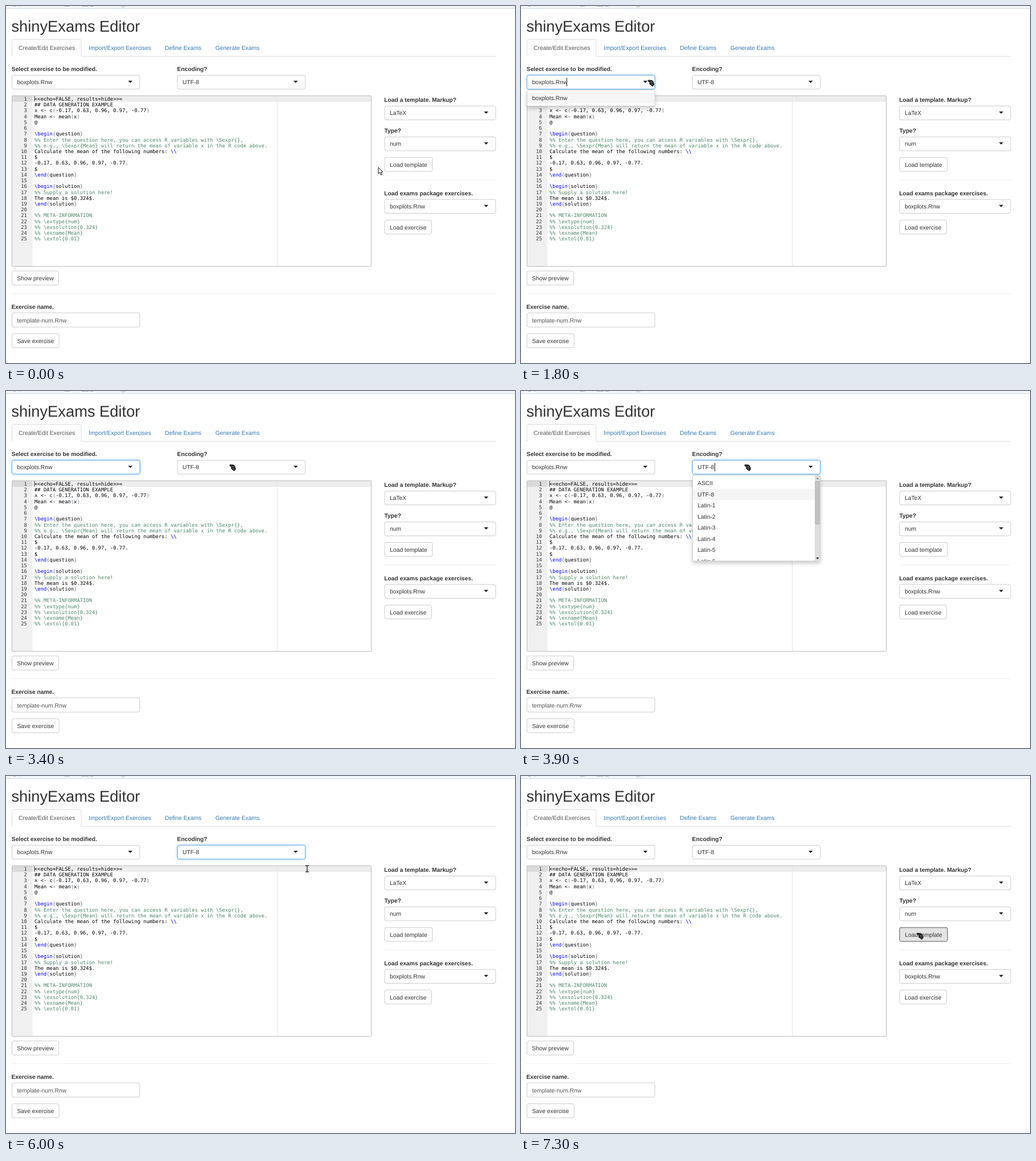
These frames come from a looping animation (894 px wide and 626 px high, 8 s). An HTML page:

```html
<!DOCTYPE html>
<html lang="en">
<head>
<meta charset="utf-8">
<title>shinyExams Editor</title>
<style>
  html, body { margin: 0; width: 100%; height: 100%; overflow: hidden; background: #fff; }
  svg { display: block; text-rendering: geometricPrecision; }
  text { font: 10.33px "Liberation Sans", Arial, sans-serif; fill: #333; }
  .title { font-size: 27.3px; }
  .label { font-size: 10.27px; font-weight: bold; }
  .link { fill: #337ab7; }
  .muted { fill: #555; }
  .mid { text-anchor: middle; }
  .code, .num { font: 8.845px "DejaVu Sans Mono", monospace; fill: #000; }
  .num { fill: #333; text-anchor: end; }
  .comment { fill: #4c886b; }
  .keyword { fill: #00f; }
  .paren { fill: #687687; }
  .box { fill: #fff; stroke: #ccc; }
  .glow { fill: #fff; stroke: #66afe9; filter: drop-shadow(0 0 2.5px rgba(102,175,233,.6)); }
  .menu { fill: #fff; stroke: #d0d0d0; filter: drop-shadow(0 4.5px 3.5px rgba(0,0,0,.2)); }
  .rule { stroke: #eee; }
</style>
</head>
<body>
<svg id="stage" width="894" height="626" viewBox="0 0 894 626"></svg>
<script>
const ROW = 10.22, ITEM = 19.57;
const source = String.raw`<<echo=FALSE, results=hide>>=
## DATA GENERATION EXAMPLE
x <- c(-0.17, 0.63, 0.96, 0.97, -0.77)
Mean <- mean(x)
@

\begin{question}
%% Enter the question here, you can access R variables with \Sexpr{},
%% e.g., \Sexpr{Mean} will return the mean of variable x in the R code above.
Calculate the mean of the following numbers: \\
$
-0.17, 0.63, 0.96, 0.97, -0.77.
$
\end{question}

\begin{solution}
%% Supply a solution here!
The mean is $0.324$.
\end{solution}

%% META-INFORMATION
%% \extype{num}
%% \exsolution{0.324}
%% \exname{Mean}
%% \extol{0.01}`.split("\n");

const text = (x, y, str, cls = "") => `<text x="${x}" y="${y}" class="${cls}">${str}</text>`;
const rect = (x, y, w, h, attrs) => `<rect x="${x}" y="${y}" width="${w}" height="${h}" ${attrs}/>`;
const path = (d, attrs) => `<path d="${d}" ${attrs}/>`;
const hidden = (id, body) => `<g id="${id}" opacity="0">${body}</g>`;

function select(x, y, w, value, id) {
  const size = [x, y, w, 24.3];
  return rect(...size, 'rx="3" class="box"')
    + (id ? hidden(id, rect(...size, 'rx="3" class="glow"')) : "")
    + text(x + 8.9, y + 15.5, value)
    + path(`M${x + w - 20.5} ${y + 9.5}h7.6l-3.8 4z`, 'fill="#222"');
}

const button = (x, y, w, label) =>
  rect(x, y, w, 24.5, 'rx="3" class="box"') + text(x + w / 2, y + 16.2, label, "mid");

function codeLine(line, i) {
  const y = 166 + i * ROW;
  const safe = line.replace(/</g, "&lt;").replace(/>/g, "&gt;");
  const body = line.startsWith("%%") ? safe : safe
    .replace(/[{}()]/g, '<tspan class="paren">$&</tspan>')
    .replace(/\\(\\|[a-z]+)/g, '<tspan class="keyword">$&</tspan>');
  return text(36.9, y, i + 1, "num")
    + text(50, y, body, line.startsWith("%%") ? "code comment" : "code");
}

const editor = rect(10.5, 157.3, 631, 299.2, 'fill="#fff"')
  + rect(11, 157.5, 35.5, 299, 'fill="#f0f0f0"')
  + rect(11, 157.5, 35.5, 10.5, 'fill="#dadada"')
  + rect(46.5, 157.5, 595, 10.5, 'fill="#ededed"')
  + path("M476.5 157.5V456", 'stroke="#e6e6e6"')
  + source.map(codeLine).join("")
  + path("M50.2 158V167.5", 'stroke="#000" stroke-width=".8"')
  + rect(10.5, 157.3, 631, 299.2, 'rx="1" fill="none" stroke="#bbb"');

const browserEdge = rect(0, 0, 894, 4, 'fill="#f3f7f9"')
  + path("M0 4.5H894", 'stroke="#d3dde1"')
  + path("M13 .5h4M24 .5h1M103 .5h9M133 .5h12M148 .5h6", 'stroke="#b5babd"')
  + '<circle cx="206" cy="-2" r="4" fill="none" stroke="#b5babd"/>';

const tabs = path("M132 88.3H861", 'stroke="#ddd"')
  + path("M10.5 88.3V61.5q0-3 3-3H129q3 0 3 3V88.3", 'fill="#fff" stroke="#ddd"')
  + path("M0 88.3H10.5", 'stroke="#fff"')
  + text(22.1, 77.2, "Create/Edit Exercises", "muted")
  + text(145.3, 77.2, "Import/Export Exercises", "link")
  + text(279, 77.2, "Define Exams", "link")
  + text(367.8, 77.2, "Generate Exams", "link");

const encodings = ["ASCII", "UTF-8", ...[1, 2, 3, 4, 5, 6].map(n => "Latin-" + n)];
const fileMenu = rect(10.5, 147.5, 224.5, 27.8, 'rx="2" class="menu"')
  + rect(11, 151.5, 223.5, ITEM, 'fill="#f5f5f5"')
  + text(19.4, 165, "boxplots.Rnw");
const encodingMenu = rect(301.5, 147.5, 224, 150.5, 'rx="2" class="menu"')
  + rect(302, 171.2, 214, ITEM, 'fill="#f5f5f5"')
  + `<g clip-path="url(#list)">${encodings.map((e, i) => text(310, 165 + i * ITEM, e)).join("")}</g>`
  + rect(516, 148, 9, 149.5, 'fill="#dedede"')
  + rect(517, 158.5, 7, 75, 'rx="1" fill="#c2c2c2" stroke="#a9a9a9" stroke-width=".7"')
  + path("M518.3 154.5h5l-2.5-3z", 'fill="#888"')
  + path("M518.3 292h5l-2.5 3z", 'fill="#111"');

const hover = rect(665, 265.5, 84, 24.5, 'rx="3" fill="#e6e6e6" stroke="#adadad"')
  + text(707, 281.7, "Load template", "mid");
const pressed = rect(665, 265.5, 84, 24.5, 'rx="3" fill="#e4e4e4" stroke="#8c8c8c"')
  + path("M666 267H748", 'stroke="#000" stroke-opacity=".08" stroke-width="2"')
  + rect(665, 265.5, 84, 24.5, 'rx="2" fill="none" stroke="#555" stroke-width=".7" stroke-dasharray="1 1"')
  + text(707, 281.7, "Load template", "mid");

const pointers = {
  arrow: path("M0 0V11.3L2.6 8.9 4.6 13.2 6.5 12.3 4.5 8.2H8Z", 'fill="#fff" stroke="#111" stroke-width="1"'),
  beam: path("M-3.2-5.5H-1Q0-5.5 0-4.5Q0-5.5 1-5.5H3.2M0-4.5V4.5M-3.2 5.5H-1Q0 5.5 0 4.5Q0 5.5 1 5.5H3.2",
    'fill="none" stroke="#111" stroke-width="1.2"'),
  hand: path("M0 1L1.8 0 7.5 .8 9.5 3 10.6 6.5 10.8 8.5 8.2 11.2 5.6 9 2.8 6.8 3.2 5.4 4.6 5.2 1 2.6Z",
    'fill="#262626" stroke="#111" stroke-width=".8"')
    + path("M4.5 3.2L7.5 6.5M6.5 2.6L9 5.5M6 7L8.5 9", 'stroke="#aaa" stroke-width=".6"')
};

const stage = document.getElementById("stage");
stage.innerHTML = '<clipPath id="list"><rect x="302" y="148" width="214" height="149.5"/></clipPath>'
  + browserEdge
  + text(9.4, 45, "shinyExams Editor", "title")
  + tabs
  + text(9.8, 114, "Select exercise to be modified.", "label")
  + text(300.6, 114, "Encoding?", "label")
  + editor
  + select(10.5, 121.4, 224.5, "boxplots.Rnw", "fileGlow")
  + select(301.2, 121.4, 224.3, "UTF-8", "encodingGlow")
  + text(664.3, 167.8, "Load a template. Markup?", "label")
  + select(665, 175.4, 195, "LaTeX")
  + text(664.6, 222.3, "Type?", "label")
  + select(665, 229.6, 195, "num")
  + button(665, 265.5, 84, "Load template")
  + path("M665 305H860", 'class="rule"')
  + text(664.3, 331.6, "Load exams package exercises.", "label")
  + select(665, 339.2, 195, "boxplots.Rnw")
  + button(665, 375.3, 82.5, "Load exercise")
  + button(10.5, 464.7, 82, "Show preview")
  + path("M10 504.5H860", 'class="rule"')
  + text(9.4, 530.7, "Exercise name.", "label")
  + rect(10.5, 538, 224.5, 25, 'rx="3" class="box"')
  + text(19.5, 554.5, "template-num.Rnw", "muted")
  + button(10.5, 574.7, 82.7, "Save exercise")
  + hidden("fileMenu", fileMenu) + hidden("encodingMenu", encodingMenu)
  + hidden("fileCaret", path("M80.5 126V141", 'stroke="#222"'))
  + hidden("encodingCaret", path("M340.5 126V141", 'stroke="#222"'))
  + hidden("hover", hover) + hidden("pressed", pressed)
  + Object.entries(pointers).map(([id, shape]) => hidden(id, shape)).join("");

const clamp = v => Math.max(0, Math.min(1, v));
const mix = (a, b, s) => a + (b - a) * s;
const easeOut = (u, power) => 1 - (1 - u) ** power;
const within = (t, a, b) => t >= a && t < b;
// Half way at the given tick, complete on the next one.
const fade = (t, start) => clamp((t - start + 50) / 100);

function pointerAt(t) {
  if (t < 500) {
    const s = clamp((t - 100) / 200);
    return [mix(654, 650.5, s), mix(283, 284, s)];
  }
  if (t < 2900) {
    const s = easeOut(clamp((t - 400) / 800), 2);
    return [mix(650.5, 222.8, s), 284 * (1 - s) ** 2 + 40 * s * (1 - s) + 129.8 * s * s];
  }
  if (t < 6000) {
    const u = clamp((t - 2800) / 600), s = u * u * (3 - 2 * u);
    return [mix(222.8, 392.5, s), mix(129.8, 129, s) + 72 * s * (1 - s)];
  }
  const u = clamp((t - 5900) / 700);
  return [mix(392.5, 695.5, easeOut(u, 3.88)), mix(129, 275.5, easeOut(u, 1.69))];
}

function pointerKind(x, y) {
  const over = (l, t, r, b) => within(x, l, r) && within(y, t, b);
  if (over(10, 121, 235, 146) || over(301, 121, 526, 146) || over(665, 265, 749, 290)) return "hand";
  return over(10, 157, 642, 457) ? "beam" : "arrow";
}

function show(id, opacity) {
  document.getElementById(id).setAttribute("opacity", +opacity);
}

function draw() {
  const t = Math.floor(performance.now() % 8000 / 100) * 100;
  const [x, y] = pointerAt(t), kind = pointerKind(x, y);
  show("fileGlow", t < 1800 ? 0 : 1 - fade(t, 3800));
  show("encodingGlow", fade(t, 3800) * (1 - fade(t, 7200)));
  show("fileMenu", within(t, 1800, 2600));
  show("encodingMenu", within(t, 3800, 5100));
  show("fileCaret", within(t, 1800, 2300));
  show("encodingCaret", within(t, 3800, 4300) || within(t, 4800, 5000));
  show("hover", kind === "hand" && x > 665);
  show("pressed", fade(t, 7200));
  for (const id in pointers) show(id, id === kind);
  document.getElementById(kind).setAttribute("transform", `translate(${x} ${y})`);
  requestAnimationFrame(draw);
}
draw();
</script>
</body>
</html>
```
